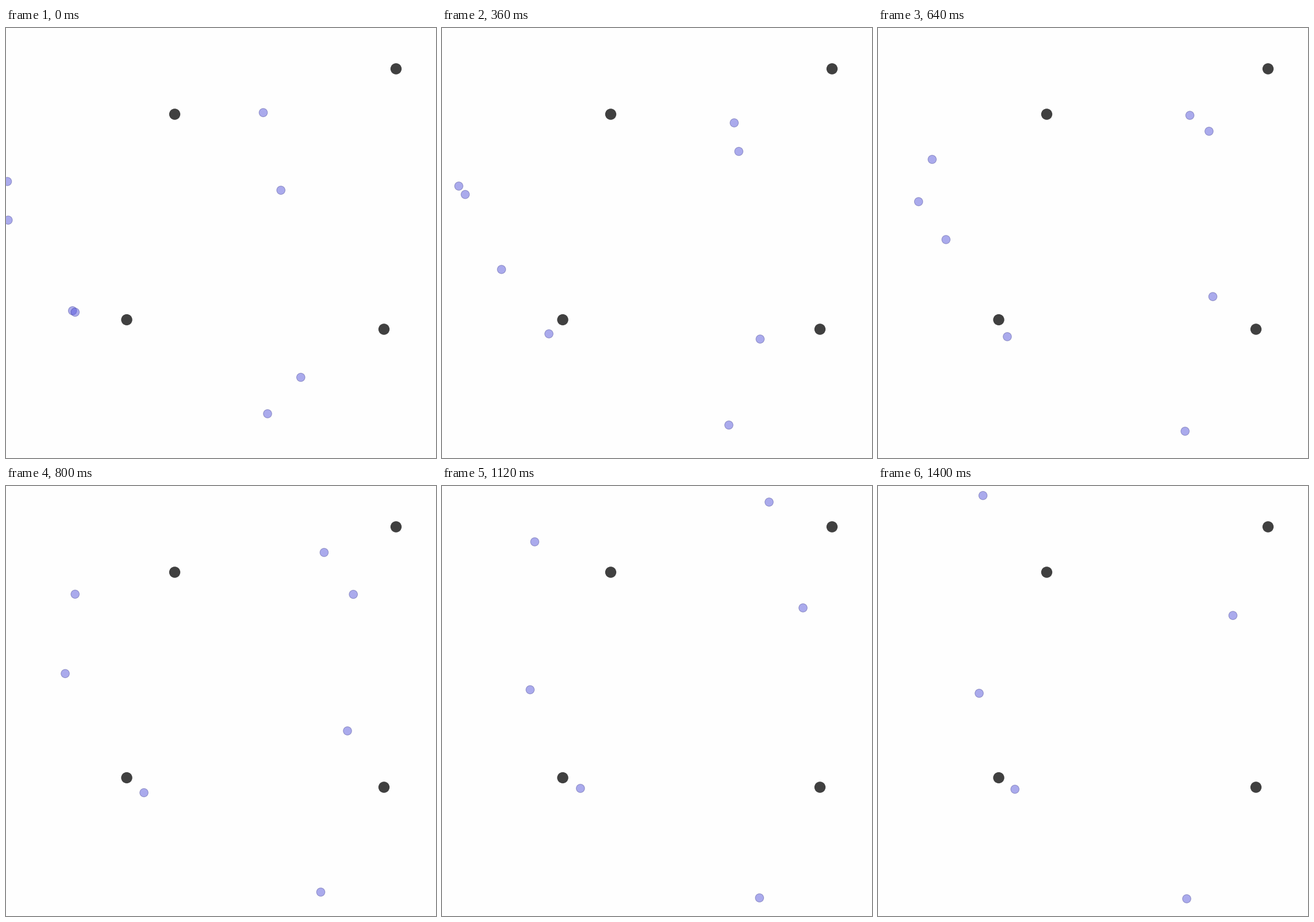
Animation, 748 px wide and 748 px high, one loop 1440 ms. Source, as a matplotlib script:

```python
import numpy as np
import matplotlib.pyplot as plt
from matplotlib.animation import FuncAnimation
from matplotlib.patches import Circle

SIZE, DPI = 748, 68
FRAMES, INTERVAL = 36, 40
PX = 72 / DPI  # one pixel in points

ANCHORS = [(293.5, 150), (678.5, 71), (210, 507.5), (657.5, 524)]

# Waypoints are reached at these steps; a path may stop early.
STEPS = [0, 4, 9, 13, 20, 28, 35]
PATHS = [
    ([(447.5, 147.2), (466.2, 152), (508.3, 165), (548.6, 173.8),
      (604.2, 188.5), (628, 212), (617.4, 225.2)], 35),
    ([(478.2, 282.2), (491, 261.6), (516.3, 214.7), (532.6, 178),
      (553.4, 115.6), (569, 28), (574, -8)], 31),
    ([(2.5, 267), (8.6, 268.6), (29.2, 275), (49.2, 286.2),
      (103, 326.3), (153.3, 354.4), (176, 360.6)], 35),
    ([(3.8, 334.2), (15, 322.2), (40.4, 289.6), (71.8, 256.2),
      (120.2, 188.2), (161.3, 97.1), (182.6, 16.6)], 35),
    ([(115.7, 491.8), (98.8, 461.7), (103.5, 420), (112.2, 389.9),
      (120, 360.5)], 17),
    ([(455, 671), (471.7, 678.7), (499, 690.7), (520.4, 697.5),
      (547.5, 706.4), (552.3, 716.5), (537, 718)], 35),
    ([(512.8, 607.7), (527, 587.2), (553.4, 541.1), (571.7, 498.7),
      (594, 426), (604, 385)], 24),
    ([(120.3, 494.4), (154, 516.1), (186, 532), (209, 537.1),
      (240, 533.5), (240.8, 526), (238.2, 527.5)], 35),
]


def cubic_basis(t, knots):
    """Basis of a cubic spline with free ends."""
    t = np.asarray(t, float)[:, None]
    return np.hstack([t ** np.arange(4), np.abs(t - knots[2:-2]) ** 3])


def trace(points, end):
    """Positions at every step up to the end of the path."""
    knots = np.array(STEPS[:len(points) - 1] + [end], float) / FRAMES
    coef = np.linalg.solve(cubic_basis(knots, knots), np.array(points))
    steps = np.arange(end + 1) / FRAMES
    return cubic_basis(steps, knots) @ coef


fig = plt.figure(figsize=(SIZE / DPI, SIZE / DPI), dpi=DPI, facecolor="#fefefe")
ax = fig.add_axes([0, 0, 1, 1])
ax.set_xlim(0, SIZE)
ax.set_ylim(SIZE, 0)
ax.axis("off")

for center in ANCHORS:
    ax.add_patch(Circle(center, 9.7, fc="#404040", ec="none"))

tracks = [trace(points, end) for points, end in PATHS]
dots = [ax.add_patch(Circle((0, 0), 7.3, fc=(0.34, 0.34, 0.86, 0.5),
                            ec=(0.1, 0.1, 0.45, 0.35), lw=PX))
        for _ in tracks]


def update(step):
    for dot, track in zip(dots, tracks):
        alive = step < len(track)
        dot.set_visible(alive)
        if alive:
            dot.center = tuple(track[step])
    return dots


anim = FuncAnimation(fig, update, frames=FRAMES, interval=INTERVAL,
                     repeat=True, repeat_delay=0, blit=False)
plt.show()
```
